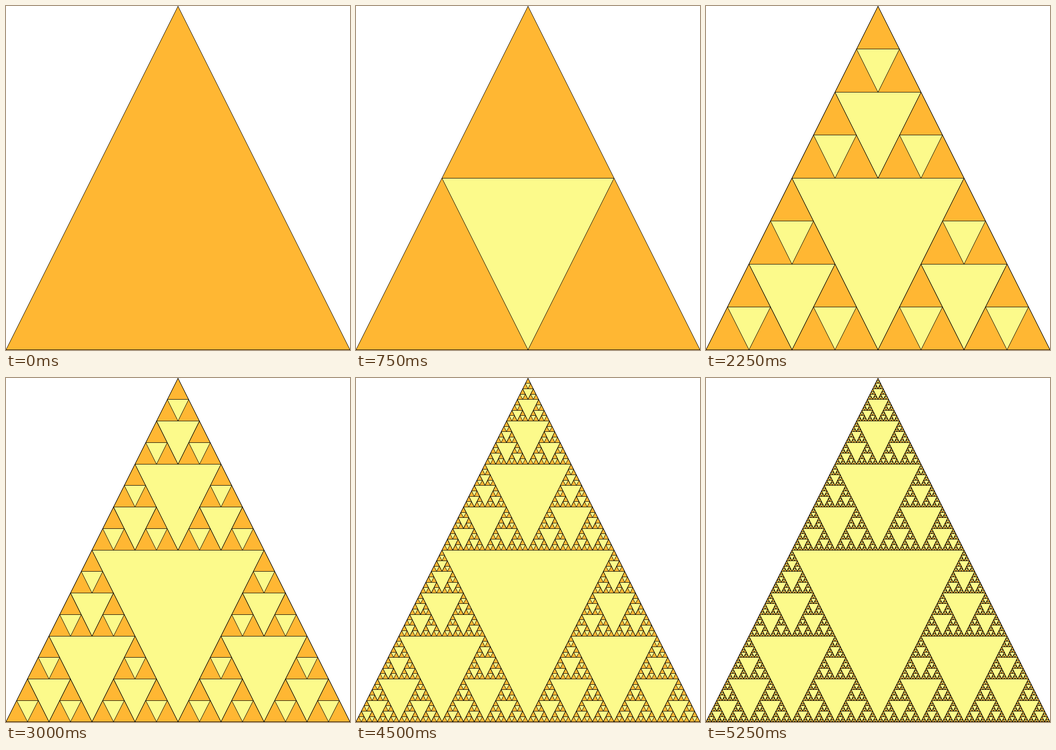
These frames come from a looping animation (748x748 px, 6000 ms). An HTML page with a canvas:

```html
<!DOCTYPE html>
<html lang="en">
<head>
<meta charset="utf-8">
<title>Triangle subdivision</title>
<style>
  html, body { margin: 0; width: 100%; height: 100%; overflow: hidden; background: #fff; }
  canvas { display: block; width: 748px; height: 748px; }
</style>
</head>
<body>
<canvas id="stage" width="748" height="748"></canvas>
<script>
const SIZE = 748, STEP = 750, STEPS = 8;
const ORANGE = '#ffb733', PALE = '#fcfa8b';
const ctx = document.getElementById('stage').getContext('2d');
ctx.lineWidth = 1;
ctx.lineJoin = 'bevel';
ctx.strokeStyle = '#000';

// Horizontal edges sit on whole pixel rows.
const row = y => Math.min(Math.floor(y), SIZE - 1) + 0.5;

// A triangle with its flat edge at `base` and its point at `tip`.
function triangle(cx, base, tip, half, fill, passes) {
  ctx.beginPath();
  ctx.moveTo(cx - half, row(base));
  ctx.lineTo(cx + half, row(base));
  ctx.lineTo(cx, row(tip));
  ctx.closePath();
  ctx.fillStyle = fill;
  ctx.fill();
  for (let i = 0; i < passes; i++) ctx.stroke();
}

function divide(cx, top, size, depth) {
  if (!depth) return;
  const half = size / 2, quarter = size / 4, mid = top + half;
  triangle(cx, mid, top + size, quarter, PALE, depth > 1 ? 2 : 1);
  divide(cx, top, half, depth - 1);
  divide(cx - quarter, mid, half, depth - 1);
  divide(cx + quarter, mid, half, depth - 1);
}

function draw(depth) {
  ctx.clearRect(0, 0, SIZE, SIZE);
  triangle(SIZE / 2, SIZE, 0, SIZE / 2, ORANGE, depth > 1 ? 2 : 1);
  divide(SIZE / 2, 0, SIZE, depth);
}

const start = performance.now();
let shown = -1;
function tick(now) {
  const depth = Math.floor(Math.max(0, now - start) / STEP) % STEPS;
  if (depth !== shown) draw(shown = depth);
  requestAnimationFrame(tick);
}
tick(start);
</script>
</body>
</html>
```
